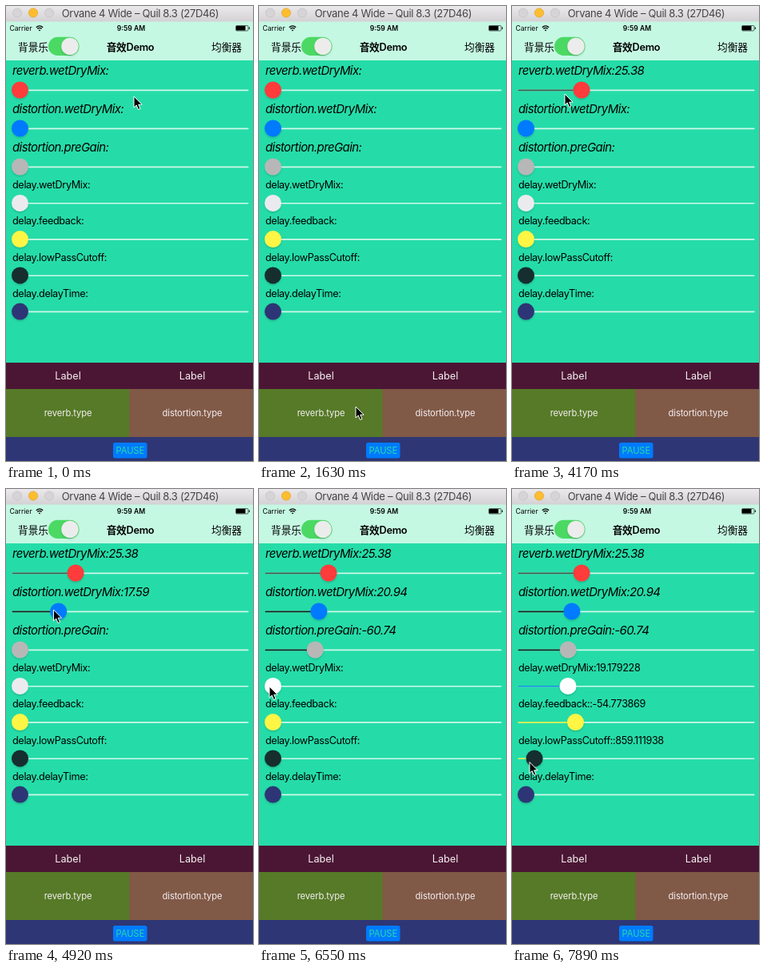
Recreate the animation shown at these times as an HTML page. Size 309 by 569 pixels, loop 8 s.

```html
<!DOCTYPE html>
<html lang="zh">
<head>
<meta charset="utf-8">
<style>
html, body { margin: 0; width: 100%; height: 100%; overflow: hidden; background: #25dca8 }
svg { display: block; width: 309px; height: 569px }
text { font: 12.7px Inter, "Noto Sans CJK SC", "Noto Sans CJK", sans-serif; letter-spacing: -.031em; white-space: pre }
.mid { text-anchor: middle }
.light { fill: #f4eff1 }
.big { font-size: 15px; font-style: italic; letter-spacing: -.04em }
.small { font-size: 11.2px; letter-spacing: -.01em }
.status { font-size: 8.6px; letter-spacing: 0 }
.bold { font-weight: 600 }
</style>
</head>
<body>
<svg viewBox="0 0 309 569">
  <defs>
    <linearGradient id="bar" x2="0" y2="1">
      <stop stop-color="#ebe9eb"/><stop offset="1" stop-color="#d3d1d3"/>
    </linearGradient>
    <filter id="shadow" x="-30%" y="-30%" width="160%" height="170%">
      <feDropShadow dx="0" dy="1.5" stdDeviation="1.2" flood-opacity=".18"/>
    </filter>
  </defs>

  <rect width="309" height="569" fill="#25dca8"/>
  <rect y="19" width="309" height="49" fill="#c5f8e3"/>
  <rect width="309" height="19.5" fill="url(#bar)"/>
  <g stroke-width=".7">
    <circle cx="14" cy="8.5" r="5.6" fill="#d6d4d6" stroke="#c2c0c2"/>
    <circle cx="34" cy="8.5" r="5.6" fill="#fdbd2e" stroke="#e0a32a"/>
    <circle cx="54" cy="8.5" r="5.6" fill="#d6d4d6" stroke="#c2c0c2"/>
  </g>
  <text class="mid" x="168" y="14" fill="#454345" style="font-size:13px;letter-spacing:-.025em">Orvane 4 Wide – Quil 8.3 (27D46)</text>

  <text class="status" x="4.5" y="31">Carrier</text>
  <g fill="none" stroke="#000" stroke-width="1.3">
    <path d="M37.8 26.8q4.2-3.8 8.4 0M39.3 28.6q2.7-2.4 5.4 0"/>
    <path d="M42 31.4l-1.3-1.5q1.3-1 2.6 0z" fill="#000" stroke="none"/>
  </g>
  <text class="status bold mid" x="156.5" y="31">9:59 AM</text>
  <rect x="287.5" y="24.5" width="15.5" height="6.5" rx="1.2" fill="none" stroke="#000" stroke-width=".6"/>
  <path d="M288 25h11.5v5.5h-11.5zM303.8 26.5h1v2.5h-1z"/>

  <text x="15" y="56" style="letter-spacing:0">背景乐</text>
  <rect x="53" y="38.8" width="38.5" height="23.2" rx="11.6" fill="#4bd964"/>
  <circle cx="80" cy="50.4" r="10.7" fill="#ececec" filter="url(#shadow)"/>
  <text class="bold mid" x="155.5" y="56" style="letter-spacing:-.02em">音效Demo</text>
  <text x="257" y="56" style="letter-spacing:0">均衡器</text>

  <g id="sliders"></g>

  <rect y="446" width="309" height="33" fill="#4b1634"/>
  <rect y="479" width="155" height="60" fill="#567a27"/>
  <rect x="154.5" y="479" width="154.5" height="60" fill="#815947"/>
  <rect y="539" width="309" height="30" fill="#2e3675"/>
  <rect x="134" y="546" width="42.5" height="19.5" rx="2.5" fill="#007aff"/>
  <g class="mid light">
    <text x="77.5" y="467" style="letter-spacing:0">Label</text>
    <text x="233" y="467" style="letter-spacing:0">Label</text>
    <text class="small" x="77.5" y="513">reverb.type</text>
    <text class="small" x="233" y="513">distortion.type</text>
    <text class="small" x="155.3" y="559.5" style="fill:#25dca8">PAUSE</text>
  </g>
  <path id="cursor" d="M0 0V14l3.2-3 2.3 5.5 2.5-1.1-2.3-5.2h4.4z" stroke="#fff" stroke-width="1" stroke-linejoin="round"/>
</svg>
<script>
const LOOP = 8000, TICK = 149;

// Drags run from tick `from` to tick `to`; values map min..max onto the track.
const sliders = [
  { name: 'reverb.wetDryMix:', y: 105, thumb: '#ff3b3a', fill: '#3b5a4d', from: 24, to: 28, min: 0, max: 100, end: 25.38 },
  { name: 'distortion.wetDryMix:', y: 153, thumb: '#007aff', fill: '#06231b', from: 30, to: 35, min: 0, max: 100, end: 20.94 },
  { name: 'distortion.preGain:', y: 201, thumb: '#b7b7b7', fill: '#06231b', from: 38, to: 41, min: -80, max: 20, end: -60.74 },
  { name: 'delay.wetDryMix:', y: 246.4, thumb: '#ebebef', fill: '#0e90e0', from: 44, to: 47, min: 0, max: 100, end: 19.179228 },
  { name: 'delay.feedback:', y: 291.6, thumb: '#fff544', fill: '#d4ee4a', from: 48, to: 51, min: -100, max: 100, end: -54.773869 },
  { name: 'delay.lowPassCutoff:', y: 336.9, thumb: '#122f2f', fill: '#d4ee4a', from: 52, to: 53, min: 10, max: 22050, end: 859.111938 },
  { name: 'delay.delayTime:', y: 382.1, thumb: '#2f3676', fill: '#2f3676', from: 99, to: 100, min: 0, max: 2, end: 0 },
];

// Pointer path: tick, x, y
const path = [
  [0, 160, 113], [3, 151, 86], [4, 151, 86], [8, 146, 320], [11, 121, 501], [19, 121, 501],
  [22, 62, 240], [24, 20, 102], [27, 87, 105], [28, 66, 110], [30, 16, 151], [34, 74, 151],
  [36, 71, 150], [38, 15, 199], [41, 70, 203], [42, 45, 226], [44, 13, 247], [47, 66, 249],
  [48, 14, 292], [50, 77, 297], [51, 17, 342], [52, 17, 342], [53, 22, 341.5],
];

const lerp = (a, b, p) => a + (b - a) * p;
const clamp = p => Math.max(0, Math.min(1, p));

function pointer(n) {
  const i = path.findIndex(k => k[0] >= n);
  if (i < 1) return path[i ? path.length - 1 : 0].slice(1);
  const [a, b] = [path[i - 1], path[i]];
  const p = (n - a[0]) / (b[0] - a[0]);
  return [lerp(a[1], b[1], p), lerp(a[2], b[2], p)];
}

function drawSlider(s, i, n) {
  const p = clamp((n - s.from) / (s.to - s.from));
  const share = (s.end - s.min) / (s.max - s.min) * (1 - (1 - p) ** 2);
  const x = 17.5 + 274 * share;
  const big = i < 3;
  const extra = i == 4 || i == 5 ? ':' : '';
  const value = p ? extra + lerp(s.min, s.max, share).toFixed(big ? 2 : 6) : '';
  const thumb = i == 3 && n >= s.from ? '#fff' : s.thumb;
  return `<text class="${big ? 'big' : ''}" x="8" y="${s.y - (big ? 19 : 18.3)}">${s.name}${value}</text>
    <rect x="7.5" y="${s.y - .5}" width="296" height="1.7" rx=".8" fill="#d0f7e9"/>
    <rect x="7.5" y="${s.y - .5}" width="${x - 7.5}" height="1.7" rx=".8" fill="${s.fill}"/>
    <circle cx="${x}" cy="${s.y}" r="10.5" fill="${thumb}" filter="url(#shadow)"/>`;
}

const group = document.getElementById('sliders');
const cursor = document.getElementById('cursor');
let shown = -1;

function frame() {
  const n = Math.floor(performance.now() % LOOP / TICK + .08);
  if (n != shown) {
    shown = n;
    group.innerHTML = sliders.map((s, i) => drawSlider(s, i, n)).join('');
    cursor.setAttribute('transform', `translate(${pointer(n)})`);
  }
  requestAnimationFrame(frame);
}
frame();
</script>
</body>
</html>
```
